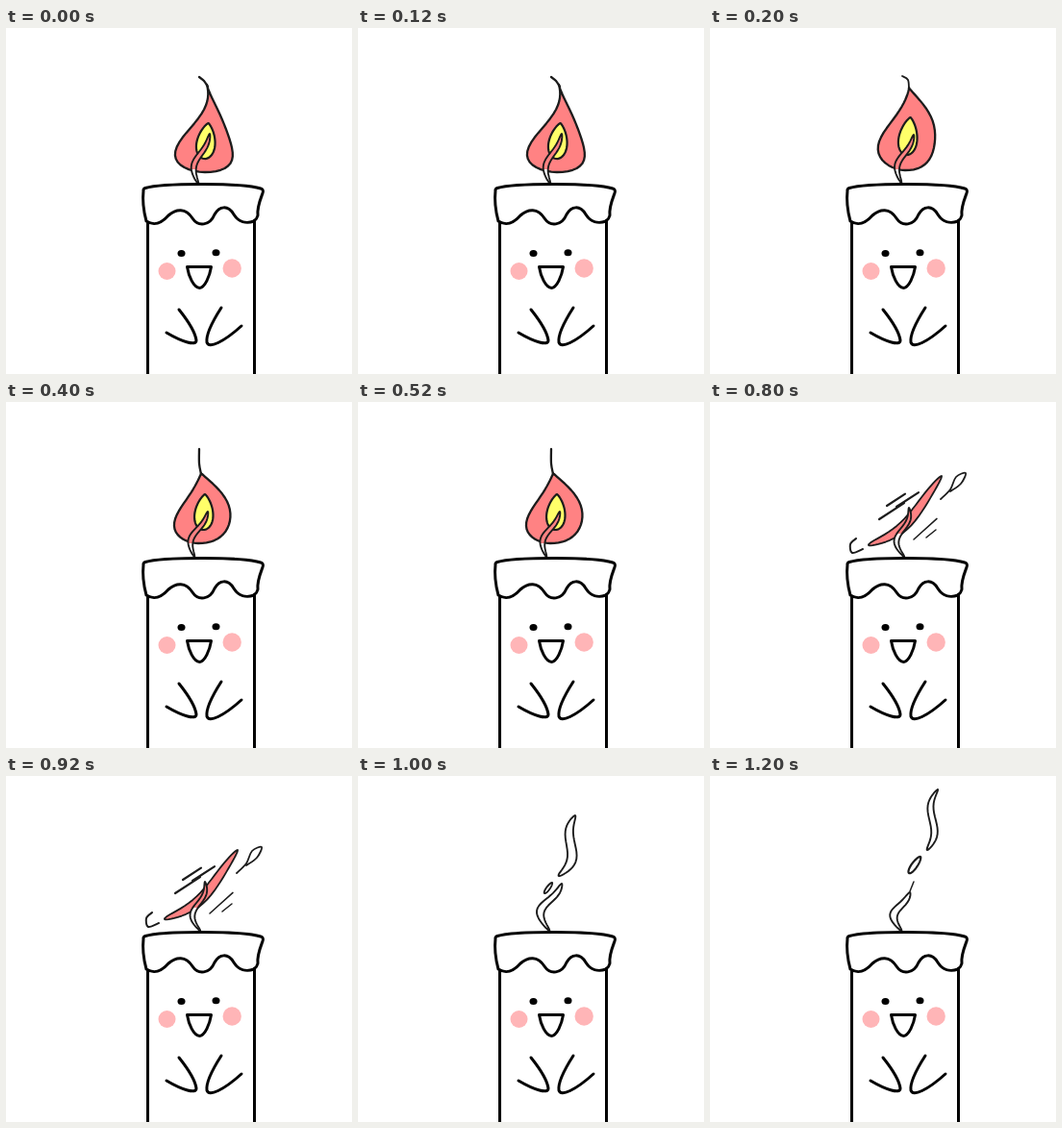
An HTML page that plays this animation: 360 by 360 pixels, repeating every 1.4 s.

```html
<!DOCTYPE html>
<html lang="en">
<head>
<meta charset="utf-8">
<title>Candle</title>
<style>
  html, body { margin: 0; width: 100%; height: 100%; overflow: hidden; background: #fff; }
  svg { display: block; width: 100%; height: 100%; }
</style>
</head>
<body>
<svg viewBox="0 0 360 360" fill="none" stroke-linecap="round" stroke-linejoin="round">
  <defs>
    <linearGradient id="wick" gradientUnits="userSpaceOnUse" x1="0" y1="100" x2="0" y2="160">
      <stop offset=".78" stop-color="#ff8283"/>
      <stop offset=".78" stop-color="#fff"/>
    </linearGradient>
    <linearGradient id="bentWick" gradientUnits="userSpaceOnUse" x1="0" y1="100" x2="0" y2="160">
      <stop offset=".62" stop-color="#ff8283"/>
      <stop offset=".62" stop-color="#fff"/>
    </linearGradient>
  </defs>
  <g id="flame" stroke="#1c1c1c"></g>
  <g stroke="#000" stroke-width="3">
    <path d="M147.5 203V362M258.500 200V362"/>
    <path d="M145 166.500C161 161.500 244 160.500 265 167Q268.500 168 267 172C264 180 261 187 262 195Q261 199 258 201C250 204 242 202 237 194C231 184 222 185 217 194C212 206 200 207 194 198C187 187 177 188 169 195C161 204 154 206 146 201C143 190 142 178 143 169Q143 167 145 166.500Z"/>
    <path d="M188.500 248.500H213.500C212 258 207 270 201.500 270.500C195 270 190 258 188.500 248.500Z"/>
    <path d="M180 293C188 303 197 317 198 325C198 331 184 327 167 317M224 291C215 305 208 320 209 327C211 334 226 327 245 310"/>
  </g>
  <g fill="#000">
    <ellipse cx="182.500" cy="234.500" rx="4" ry="3.500"/>
    <ellipse cx="218.500" cy="233.700" rx="4" ry="3.500"/>
  </g>
  <g fill="#ffb5b7">
    <circle cx="167.500" cy="253" r="9"/>
    <circle cx="235.200" cy="250" r="9.700"/>
  </g>
</svg>
<script>
const STEP = 200, SAMPLES = 28;
const RED = "#ff8283", YELLOW = "#ffff69", WHITE = "#fff";

const path = (d, width, fill = "none") => `<path d="${d}" stroke-width="${width}" fill="${fill}"/>`;

// Drop from tip to base: "belly" moves the widest part down,
// "bend" bows the axis sideways and "wave" gives it an S shape.
function drop([x0, y0], [x1, y1], half, { belly = 0.6, bend = 0, wave = 0, fill = WHITE, width = 1.9 } = {}) {
  const dx = x1 - x0, dy = y1 - y0, len = Math.hypot(dx, dy);
  const profile = t => t ** belly * Math.sqrt(1 - t);
  const widest = profile(belly / (belly + 0.5));
  const points = [];
  for (let i = 0; i < 2 * SAMPLES; i++) {
    const t = (1 - Math.cos(Math.PI * i / SAMPLES)) / 2;
    const side = i < SAMPLES ? -1 : 1;
    const off = bend * Math.sin(Math.PI * t) + wave * Math.sin(2 * Math.PI * t)
      + side * half * profile(t) / widest;
    points.push([x0 + dx * t + off * dy / len, y0 + dy * t - off * dx / len].map(v => v.toFixed(2)));
  }
  return path("M" + points.join("L") + "Z", width, fill);
}

// Smooth stroke through a few points.
function curve(p, width = 2) {
  let d = "M" + p[0];
  for (let i = 0; i < p.length - 1; i++) {
    const a = p[i - 1] || p[i], b = p[i], c = p[i + 1], e = p[i + 2] || c;
    const near = [0, 1].map(k => b[k] + (c[k] - a[k]) / 6);
    const far = [0, 1].map(k => c[k] - (e[k] - b[k]) / 6);
    d += `C${near} ${far} ${c}`;
  }
  return path(d, width);
}

const streak = (x, y, run, slope = 1, width = 1.5) => path(`M${x} ${y}l${run} ${-run * slope}`, width);

const outer = (tip, base, half, look) => drop(tip, base, half, { fill: RED, width: 2.3, ...look });
const inner = (tip, base) => drop(tip, base, 9.7, { belly: 0.8, fill: YELLOW, width: 2.2 });
const wick = (tip, base, half = 2.8, look) =>
  drop(tip, base, half, { bend: -6.5, wave: 3.4, fill: "url(#wick)", ...look });

const poses = [
  // burning
  outer([209, 59], [207, 150], 30, { belly: 2, bend: 2.3, wave: 3 }) +
  curve([[201, 51], [206, 55], [210, 61]], 2.3) +
  inner([210.5, 99], [206, 136]) + wick([212, 110], [200, 162]),

  outer([207, 62], [203, 148], 29, { belly: 1.2, bend: 3.9, wave: 3.3 }) +
  curve([[200, 50], [206, 54], [207, 64]], 1.8) +
  inner([208.5, 93], [204, 132]) + wick([212, 111], [199, 161]),

  outer([203, 74], [200, 147], 28.5, { belly: 1.1, bend: 6, wave: 2 }) +
  curve([[201, 49], [201, 64], [203, 75]], 2.3) +
  inner([207, 96], [205, 133]) + wick([210, 114], [196, 161]),

  // blown sideways
  outer([221, 90], [180, 139], 10, { belly: 0.5, bend: 8, wave: 1, width: 1.8 }) +
  curve([[225, 62], [227, 75], [221, 92], [219, 103]], 1.7) +
  wick([207.5, 110], [199, 160], 4, { bend: -3, wave: 3, fill: "url(#bentWick)" }) +
  curve([[245, 65], [238, 76], [234, 88], [242, 95], [229, 108]], 2.5) +
  curve([[169, 122], [155, 138], [157, 149], [171, 138]], 2.3) +
  streak(174, 109, 23) + streak(181, 109, 22, 1.3) + streak(192, 104, 10, 1.3) +
  streak(210, 143, 23) + streak(225, 142, 7),

  outer([241, 77], [165, 149], 5, { bend: 10, wave: -2, width: 1.8 }) +
  wick([207, 110], [202, 161], 2.6, { bend: -6, wave: 5, fill: "url(#bentWick)" }) +
  curve([[240, 101], [250, 91], [256, 78], [266, 74], [261, 85], [250, 93]], 1.8) +
  curve([[152, 142], [146, 148], [148, 157], [159, 153]]) +
  streak(184, 108, 19, 0.65, 2.2) + streak(194, 109, 23, 0.65, 2.2) + streak(176, 122, 26, 0.65, 2.2) +
  streak(212, 143, 24, 0.9) + streak(225, 141, 10, 0.8),

  // smoke
  drop([226, 41], [209, 104], 5, { bend: 4.5, wave: -5 }) +
  drop([202, 111], [194, 122], 1.8) +
  drop([212, 112], [199, 161], 4, { bend: -11.6, wave: 4.6 }),

  drop([237, 14], [226, 77], 3.5, { wave: -4.5 }) +
  drop([219, 84], [207, 101], 3, { width: 2.2 }) +
  streak(208, 120, 4, 2.5) +
  drop([208, 121], [199, 161], 4, { bend: -9.5, wave: 3.5 })
];

const flame = document.getElementById("flame");
const start = performance.now();
let shown = -1;

function draw(now) {
  const pose = Math.floor(Math.max(0, now - start) / STEP) % poses.length;
  if (pose !== shown) flame.innerHTML = poses[shown = pose];
  requestAnimationFrame(draw);
}
draw(start);
</script>
</body>
</html>
```
